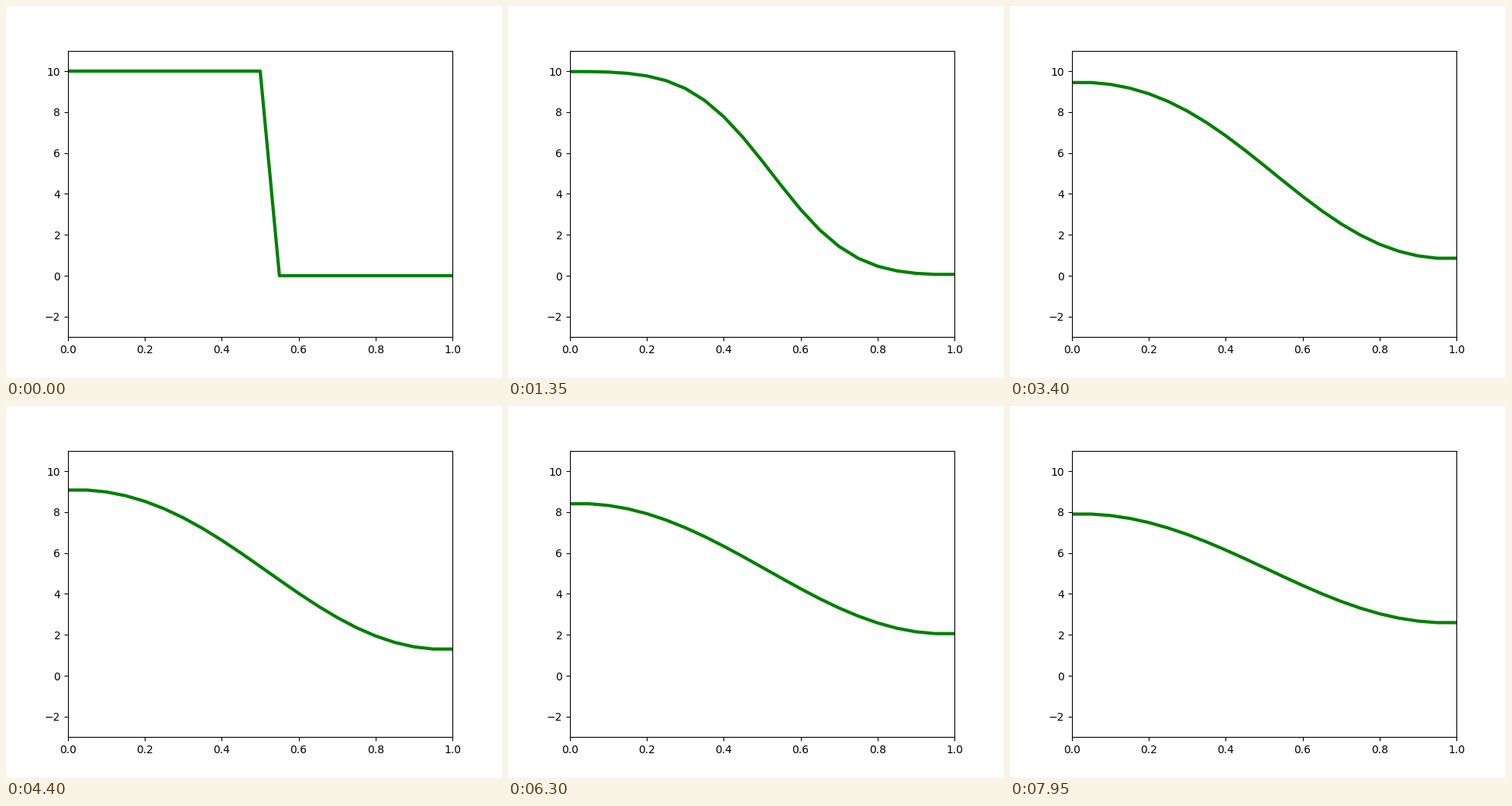
A matplotlib script that plays this animation: 640x480 px, repeating every 8000 ms.

```python
import numpy as np
import matplotlib.pyplot as plt
from matplotlib.animation import FuncAnimation

FRAMES = 160
INTERVAL = 50
RATE = 0.2  # diffusivity * dt / dx**2


def diffuse(u):
    """One explicit heat step with insulated ends."""
    v = u.copy()
    v[1:-1] += RATE * (u[2:] - 2 * u[1:-1] + u[:-2])
    v[0], v[-1] = v[1], v[-2]
    return v


x = np.linspace(0, 1, 21)
states = [np.where(np.arange(x.size) <= 10, 10.0, 0.0)]
for _ in range(FRAMES - 1):
    states.append(diffuse(states[-1]))

fig, ax = plt.subplots(figsize=(6.4, 4.8), dpi=100)
ax.set_xlim(0, 1)
ax.set_ylim(-3, 11)
line, = ax.plot(x, states[0], color="green", lw=3)


def update(i):
    line.set_ydata(states[i])
    return line,


anim = FuncAnimation(fig, update, frames=FRAMES, interval=INTERVAL,
                     repeat=True, repeat_delay=0)
plt.show()
```
